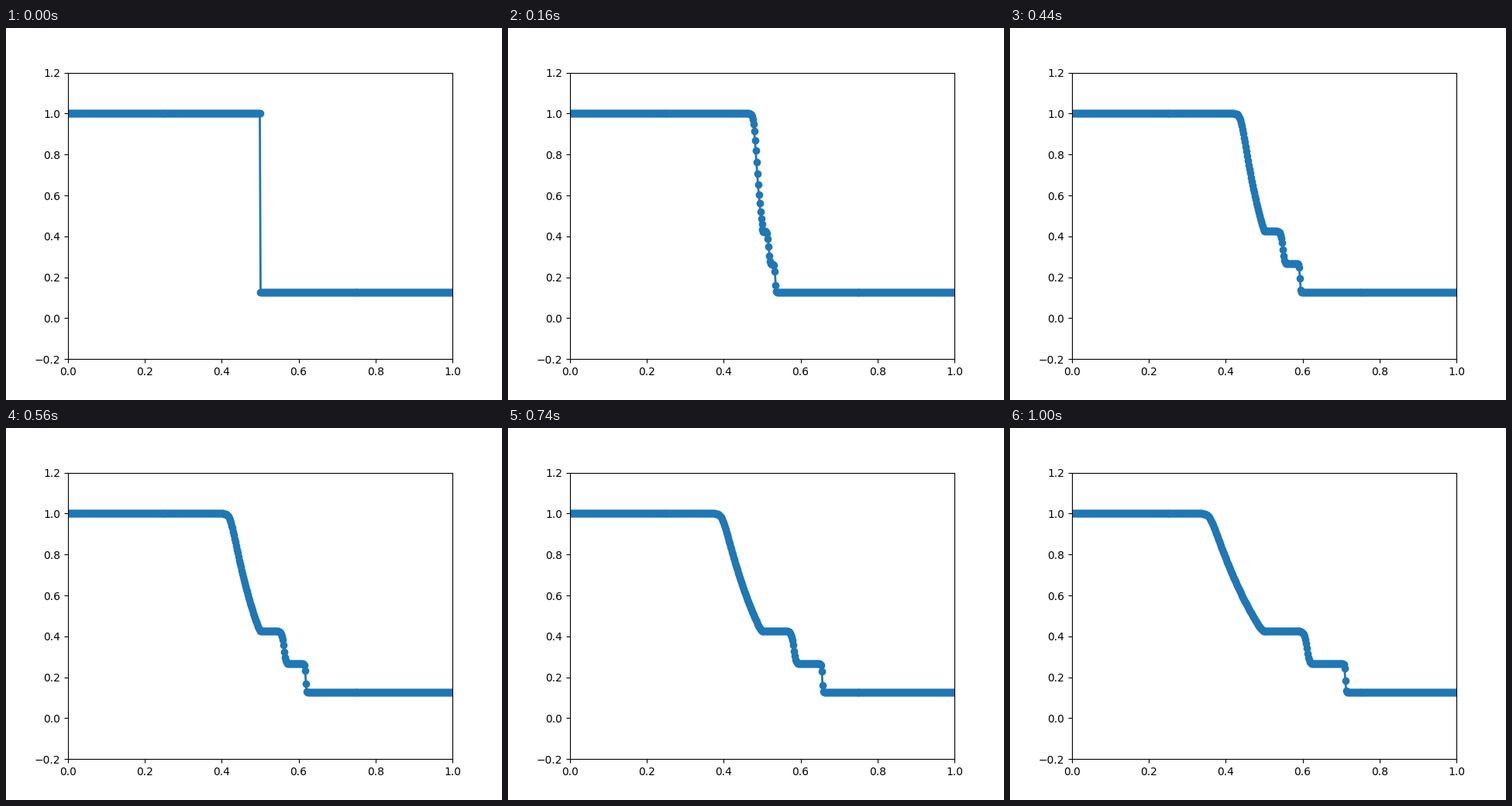
Write a matplotlib script that moves like this. It is 640 px wide and 480 px high and loops after 1020 ms.

```python
import matplotlib.pyplot as plt
import numpy as np
from matplotlib.animation import FuncAnimation

GAMMA = 1.4
CELLS = 500
FRAMES = 51
FRAME_DT = 0.0024
SUBSTEPS = 5

dx = 1 / CELLS
x = (np.arange(CELLS) + 0.5) * dx


def to_conserved(w):
    rho, u, p = w
    return np.array([rho, rho * u, p / (GAMMA - 1) + 0.5 * rho * u**2])


def to_primitive(q):
    rho, mom, energy = q
    u = mom / rho
    return np.array([rho, u, (GAMMA - 1) * (energy - 0.5 * mom * u)])


def flux(w):
    rho, u, p = w
    energy = p / (GAMMA - 1) + 0.5 * rho * u**2
    return np.array([rho * u, rho * u**2 + p, u * (energy + p)])


def minmod(a, b):
    return np.where(a * b > 0, np.sign(a) * np.minimum(abs(a), abs(b)), 0.0)


def hllc(wl, wr):
    (rl, ul, pl), (rr, ur, pr) = wl, wr
    cl, cr = np.sqrt(GAMMA * pl / rl), np.sqrt(GAMMA * pr / rr)
    sl = np.minimum(ul - cl, ur - cr)
    sr = np.maximum(ul + cl, ur + cr)
    ml, mr = rl * (sl - ul), rr * (sr - ur)
    sm = (pr - pl + ml * ul - mr * ur) / (ml - mr)

    def star(w, s, m):
        rho, u, p = w
        q = to_conserved(w)
        r = m / (s - sm)
        e = r * (q[2] / rho + (sm - u) * (sm + p / m))
        return flux(w) + s * (np.array([r, r * sm, e]) - q)

    return np.where(sl >= 0, flux(wl),
           np.where(sm >= 0, star(wl, sl, ml),
           np.where(sr > 0, star(wr, sr, mr), flux(wr))))


def step(q, dt):
    """One MUSCL-Hancock step with open ends."""
    w = to_primitive(np.pad(q, ((0, 0), (2, 2)), mode="edge"))
    d = np.diff(w, axis=1)
    half = 0.5 * minmod(d[:, :-1], d[:, 1:])
    wl, wr = w[:, 1:-1] - half, w[:, 1:-1] + half
    shift = 0.5 * dt / dx * (flux(wl) - flux(wr))
    wl = to_primitive(to_conserved(wl) + shift)
    wr = to_primitive(to_conserved(wr) + shift)
    f = hllc(wr[:, :-1], wl[:, 1:])
    return q - dt / dx * np.diff(f, axis=1)


def shock_tube():
    left = x < 0.5
    q = to_conserved(np.array([np.where(left, 1.0, 0.125),
                               np.zeros(CELLS),
                               np.where(left, 1.0, 0.1)]))
    history = [q[0]]
    for _ in range(FRAMES - 1):
        for _ in range(SUBSTEPS):
            q = step(q, FRAME_DT / SUBSTEPS)
        history.append(q[0])
    return history


density = shock_tube()

fig, ax = plt.subplots(figsize=(6.4, 4.8), dpi=100)
ax.set_xlim(0, 1)
ax.set_ylim(-0.2, 1.2)
line, = ax.plot(x, density[0], "o-", color="#1f77b4", lw=2)


def draw(i):
    line.set_ydata(density[i])
    return line,


anim = FuncAnimation(fig, draw, frames=FRAMES, interval=20,
                     repeat=True, repeat_delay=0)
plt.show()
```
